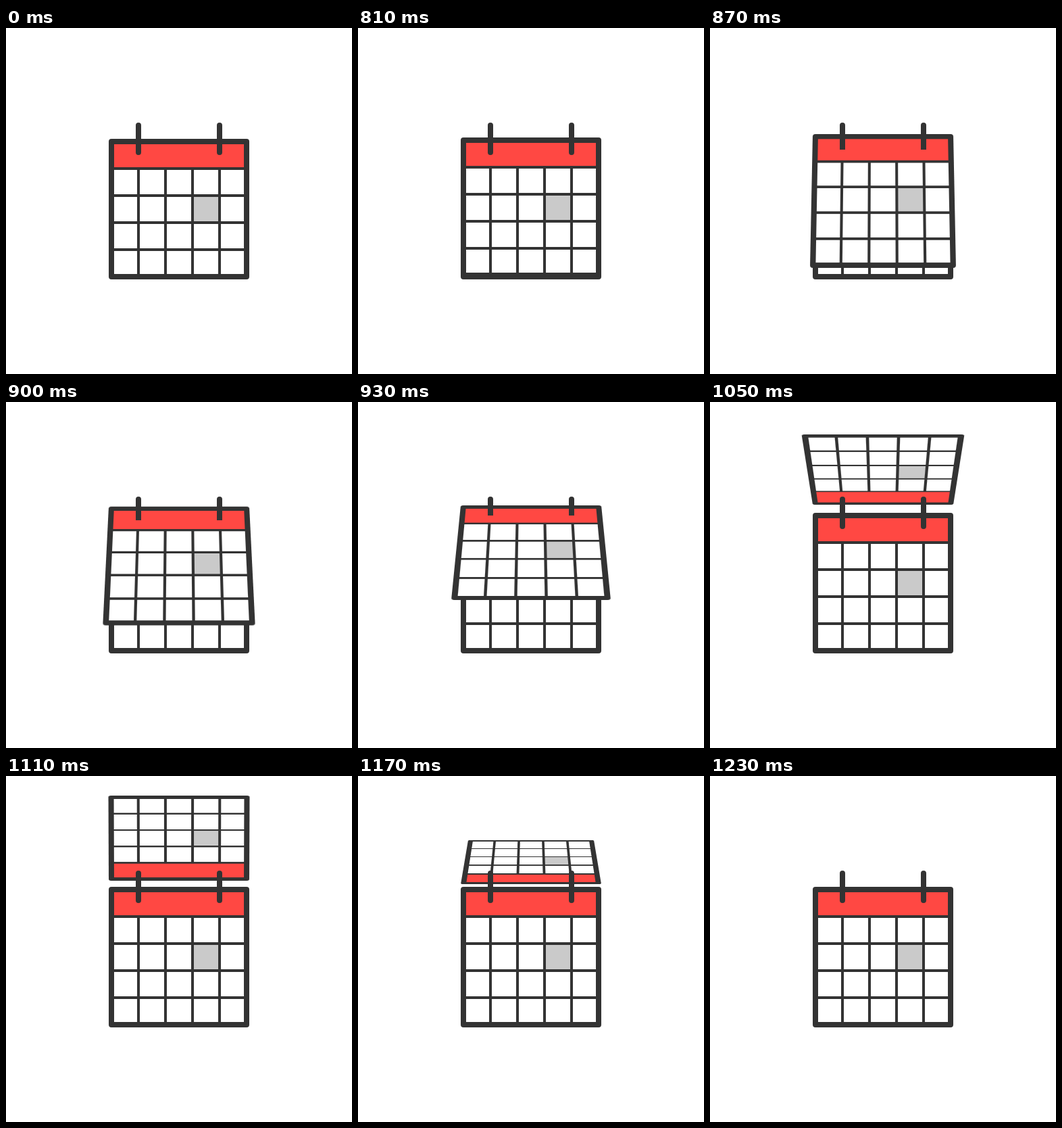
Write an HTML page that moves like this. It is 512 by 512 pixels and loops after 1350 ms.

```html
<!DOCTYPE html>
<html>
<head>
<meta charset="utf-8">
<style>
html, body { margin: 0; width: 100%; height: 100%; overflow: hidden; background: #fff; }
svg { position: absolute; left: 0; top: 0; }
#page { transform-origin: 0 0; visibility: hidden; }
</style>
</head>
<body>
<svg width="512" height="512">
  <defs>
    <g id="sheet">
      <rect x="4" y="4" width="200" height="200" fill="#fff"/>
      <rect x="4" y="4" width="200" height="40" fill="#ff4843"/>
      <rect x="124" y="84" width="40" height="40" fill="#cacaca"/>
      <path d="M4 44H204M4 84H204M4 124H204M4 164H204M44 44V204M84 44V204M124 44V204M164 44V204"
            stroke="#333" stroke-width="4"/>
      <rect x="4" y="4" width="200" height="200" fill="none" stroke="#333" stroke-width="8" stroke-linejoin="round"/>
    </g>
  </defs>
  <use href="#sheet" x="152" y="164"/>
</svg>
<svg id="page" width="208" height="208"><use href="#sheet"/></svg>
<svg id="rings" width="512" height="512">
  <path d="M196 144V184M316 144V184" stroke="#333" stroke-width="8" stroke-linecap="round"/>
</svg>
<script>
const LOOP = 1350, START = 810, END = 1230, STEP = 30, KEY = 60, SIZE = 208, MID = 256;

// One value per 60 ms of the flip
const hinge = [162, 157, 153, 151, 152, 155, 160, 165];
const edge = [370, 355, 293, 173, 48, 29, 95, 165];
const width = [208, 216, 236, 252, 241, 209, 186, 180];
const ringEnd = [188, 180, 168, 158, 146];

const page = document.getElementById('page');
const rings = document.getElementById('rings');

// Catmull-Rom through evenly spaced keys
function spline(keys, p) {
  const i = Math.floor(p), f = p - i;
  const at = n => keys[Math.max(0, Math.min(keys.length - 1, n))];
  const a = at(i - 1), b = at(i), c = at(i + 1), d = at(i + 2);
  return b + f / 2 * (c - a + f * (2 * a - 5 * b + 4 * c - d + f * (3 * (b - c) + d - a)));
}

function draw(time) {
  const t = Math.floor(time % LOOP / STEP) * STEP;
  const flipping = t >= START && t < END;
  page.style.visibility = flipping ? 'visible' : 'hidden';
  rings.style.clipPath = 'none';
  if (!flipping) return;

  const p = (t - START) / KEY;
  const top = spline(hinge, p);
  const q = SIZE / spline(width, p);
  const k = (q - 1) / SIZE;
  const slope = (spline(edge, p) * q - top) / SIZE;
  page.style.transform =
    `matrix3d(1,0,0,0, ${MID * k},${slope},0,${k}, 0,0,1,0, ${MID},${top},0,1) translateX(${-SIZE / 2}px)`;
  // The rings pass through the sheet until it stands upright
  if (p <= 3) rings.style.clipPath = `inset(0 0 ${512 - spline(ringEnd, p)}px 0)`;
}

const begin = performance.now();
function tick() {
  draw(performance.now() - begin);
  requestAnimationFrame(tick);
}
tick();
</script>
</body>
</html>
```
